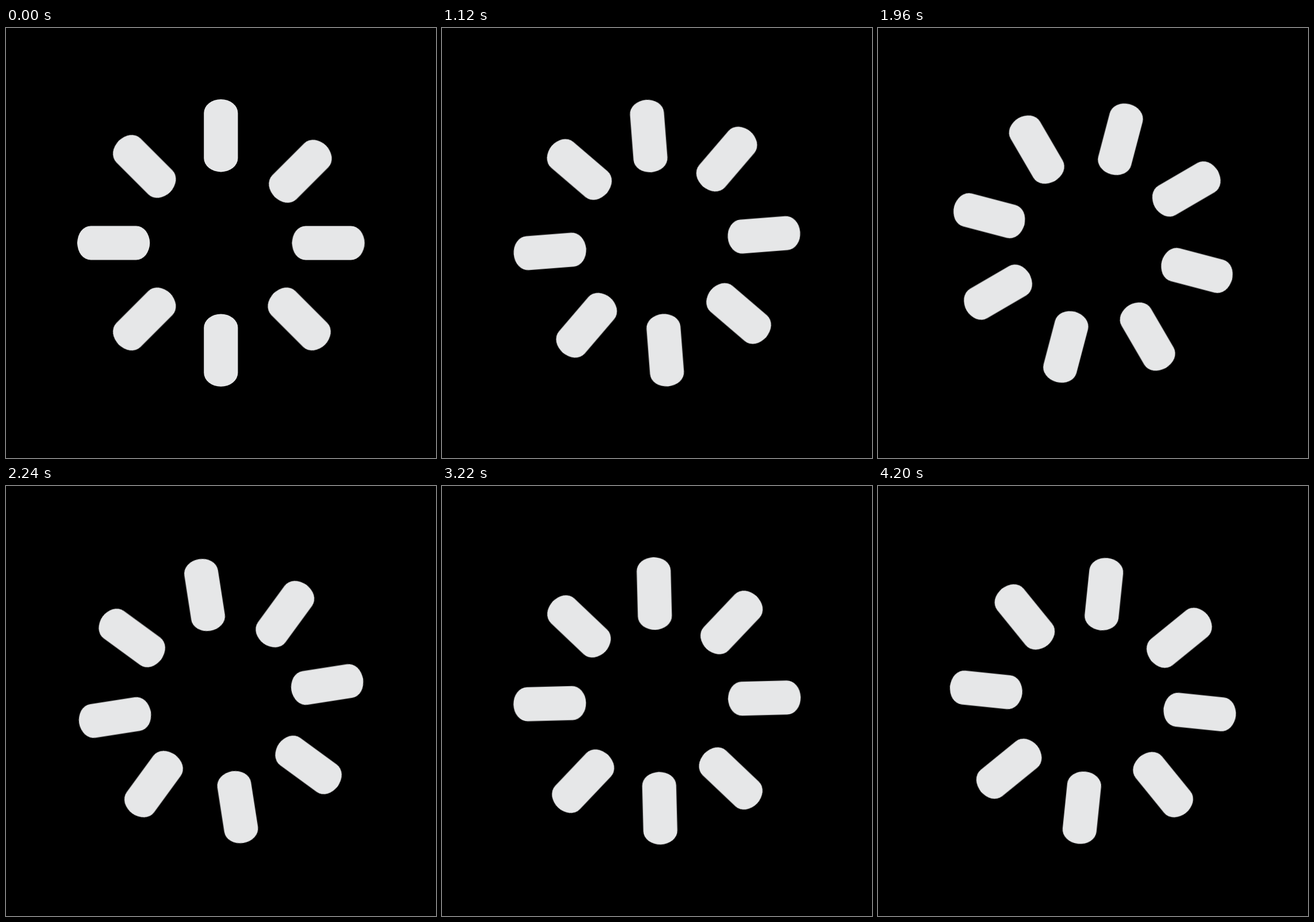
Animation, 748 px wide and 748 px high, one loop 4.27 s. Source, as an HTML page:

```html
<!DOCTYPE html>
<html lang="en">
<head>
<meta charset="utf-8">
<title>Spinner</title>
<style>
  html, body {
    margin: 0;
    width: 100%;
    height: 100%;
    overflow: hidden;
    background: #000;
  }
  svg {
    display: block;
    width: 100vw;
    height: 100vh;
  }
  .wheel {
    fill: #e6e7e8;
    transform-origin: 374px 374px;
    animation: spin 4270ms steps(61, end) infinite;
  }
  @keyframes spin {
    to { transform: rotate(-360deg); }
  }
</style>
</head>
<body>
<svg viewBox="0 0 748 748">
  <defs>
    <rect id="bar" x="-29.6" y="-63.2" width="59.2" height="126.4" rx="29.6" ry="24"/>
  </defs>
  <!-- The diagonal bars sit slightly off the even ring. -->
  <g class="wheel">
    <use href="#bar" transform="translate(373.8 187.2)"/>
    <use href="#bar" transform="translate(512 249.2) rotate(45)"/>
    <use href="#bar" transform="translate(560.6 374) rotate(90)"/>
    <use href="#bar" transform="translate(510.2 506.2) rotate(135)"/>
    <use href="#bar" transform="translate(373.8 560.6)"/>
    <use href="#bar" transform="translate(240.8 506.2) rotate(45)"/>
    <use href="#bar" transform="translate(187 373.9) rotate(90)"/>
    <use href="#bar" transform="translate(240.8 240.8) rotate(135)"/>
  </g>
</svg>
</body>
</html>
```
